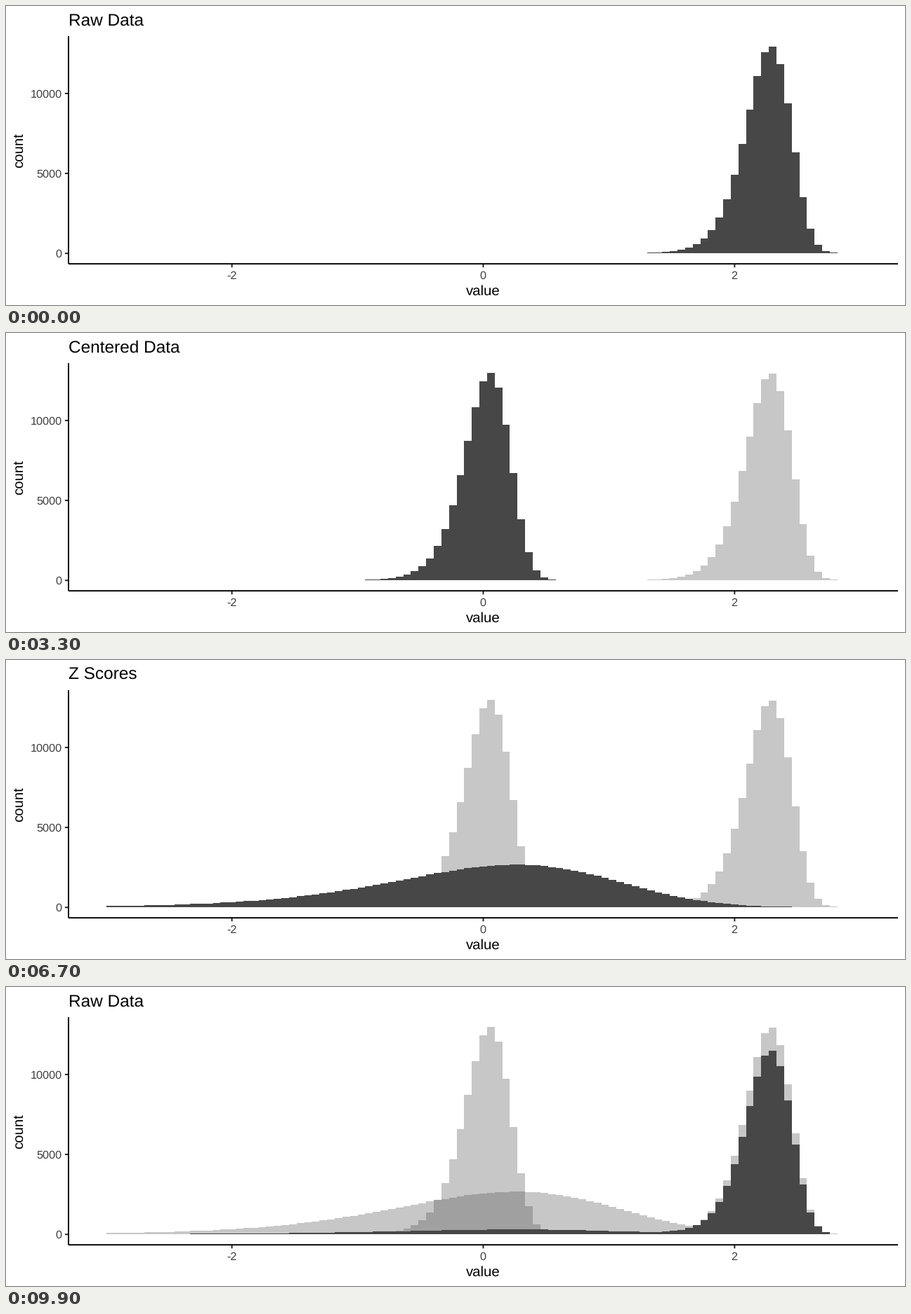
A matplotlib script for the animation above (10000 ms loop, 1280 px wide and 427 px high).

```python
import numpy as np
import matplotlib.pyplot as plt
from matplotlib.animation import FuncAnimation
from matplotlib.patches import Polygon

plt.rcParams["font.family"] = "Liberation Sans"
plt.rcParams["text.hinting"] = "none"

W, H, DPI = 1280, 427, 64
LEFT, RIGHT, TOP, BOTTOM = 89, 1270, 43, 368.2
X0, X_SCALE = (LEFT + RIGHT) / 2, (RIGHT - LEFT) / 6.6
Y0, Y_SCALE = 353.3, 0.02284
INK, TICK, LABEL = "#474747", "#252525", "#3f3f3f"
TEXT = 20.37

BIN = 6 / 99
K = np.arange(-49, 50)
SAMPLES = 100_000
Y_MEAN, Y_SD = 9.53, 1.81    # the data are log(y), y normal
MEAN, SD = 2.235, 0.205      # of log(y)

STARTS = (25, 59, 92)
STEPS = 9
TITLES = ("Raw Data", "Centered Data", "Z Scores")


def histogram(shift=0.0, scale=1.0):
    """Expected bin counts of (log(y) - shift) / scale."""
    y = np.exp(K * BIN * scale + shift)
    pdf = np.exp(-0.5 * ((y - Y_MEAN) / Y_SD) ** 2) / (Y_SD * np.sqrt(2 * np.pi))
    return SAMPLES * BIN * scale * pdf * y


states = (histogram(), histogram(MEAN), histogram(MEAN, SD))

# Bars sit on whole pixels, so their edges stay crisp.
EDGES = np.round(X0 + X_SCALE * BIN * (np.arange(K[0], K[-1] + 2) - 0.5))
BASE = round(Y0)


def outline(counts):
    tops = BASE - np.round(counts * Y_SCALE)
    px = np.repeat(EDGES, 2)
    py = np.concatenate(([BASE], np.repeat(tops, 2), [BASE]))
    return np.column_stack((px, py))


fig = plt.figure(figsize=(W / DPI, H / DPI), dpi=DPI, facecolor="white")
ax = fig.add_axes([0, 0, 1, 1])
ax.set(xlim=(0, W), ylim=(H, 0))
ax.axis("off")


def bars(counts, **style):
    return ax.add_patch(Polygon(outline(counts), closed=True, facecolor=INK,
                                edgecolor="none", lw=0, snap=False, **style))


def line(xs, ys, color="black"):
    ax.plot(xs, ys, color=color, lw=1.97 * 72 / DPI, snap=False,
            solid_capstyle="butt", zorder=4)


def label(px, py, text, size=TEXT, color="black", ha="center", rotation=0):
    return ax.text(px, py, text, fontsize=size * 72 / DPI, color=color, ha=ha,
                   va="baseline", rotation=rotation, rotation_mode="anchor")


shadows = [bars(s, alpha=0.3, zorder=1, visible=False) for s in states]
current = bars(states[0], zorder=2)

for value in (-2, 0, 2):
    px = X0 + value * X_SCALE
    line([px, px], [BOTTOM, BOTTOM + 5.1], TICK)
    label(px - 0.6, 389.6, str(value), 0.8 * TEXT, LABEL)
for count in (0, 5000, 10000):
    py = Y0 - count * Y_SCALE
    line([LEFT - 5.1, LEFT], [py, py], TICK)
    label(79.7, py + 5.9, str(count), 0.8 * TEXT, LABEL, ha="right")
line([LEFT, LEFT], [TOP, BOTTOM])
line([LEFT, RIGHT], [BOTTOM, BOTTOM])

label(X0, 412.6, "value")
label(24.9, (TOP + BOTTOM) / 2, "count", rotation=90)
title = label(LEFT, 28.2, TITLES[0], 1.2 * TEXT, ha="left")


def update(n):
    done = sum(n >= start for start in STARTS)
    here, after, t = 0, 0, 0.0
    if done:
        here, after = done - 1, done % 3
        t = min((n - STARTS[here] + 1) / STEPS, 1)
    current.set_xy(outline((1 - t) * states[here] + t * states[after]))
    for i, shadow in enumerate(shadows):
        shadow.set_visible(i < done)
    title.set_text(TITLES[after if t > 0.5 else here])
    return [current, title, *shadows]


anim = FuncAnimation(fig, update, frames=100, interval=100,
                     repeat=True, repeat_delay=0, blit=False)
plt.show()
```
